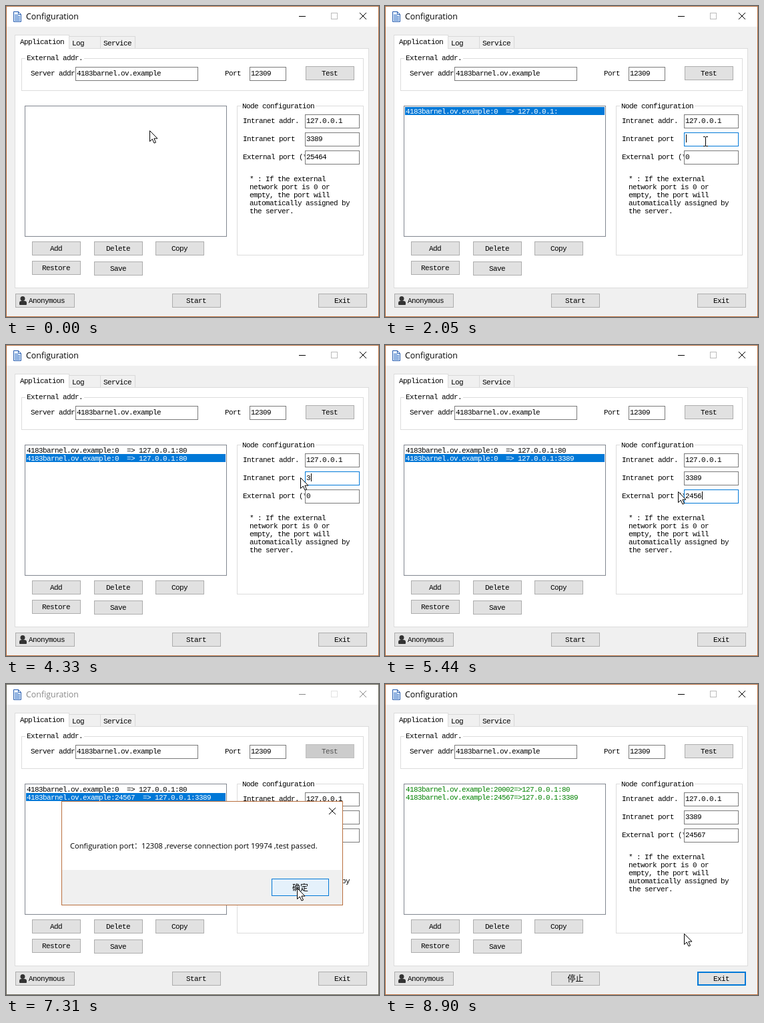
Write an HTML page with a canvas that moves like this. It is 559 px wide and 465 px high and loops after 8940 ms.

```html
<!DOCTYPE html>
<html lang="en">
<head>
<meta charset="utf-8">
<title>Configuration</title>
<style>
html, body { margin: 0; width: 100%; height: 100%; overflow: hidden; background: #f0f0f0; }
canvas { display: block; width: 559px; height: 465px; }
</style>
</head>
<body>
<canvas id="stage" width="559" height="465"></canvas>
<script>
const ctx = document.getElementById('stage').getContext('2d');
const LOOP = 8940;
const HOST = '4183barnel.ov.example';
const BLUE = '#0078d7', BROWN = '#b96f3e';
const MONO = '11px "Liberation Mono", monospace';
const CJK = '12px "Noto Sans CJK SC", "Noto Sans CJK", sans-serif';
const ui = size => `${size}px "Open Sans", "Noto Sans CJK SC", "Noto Sans CJK", sans-serif`;

// Pointer stops: arrival time, x, y
const MOVE = 300;
const STOPS = [
  [0, 215, 186], [340, 78, 364], [760, 478, 172], [1880, 480, 202],
  [2920, 262, 364], [3400, 302, 200], [3780, 476, 199], [4180, 441, 198],
  [4680, 470, 226], [4900, 439, 219], [6290, 481, 105], [6850, 440, 313],
  [7160, 436, 305], [7750, 285, 438], [8430, 149, 164], [8880, 448, 373]
];
const CLICK = { Add: 380, addr: 790, port: 1900, Copy: 2980, portAgain: 3880,
  ext: 4710, Test: 6330, ok: 7350, Start: 7860 };
const FOCUS_AFTER = { portAgain: 'port', Test: 'addr', ok: '', Start: 'Exit' };
const TYPING = {
  addr: { text: '127.0.0.1', from: 820, gap: 85 },
  port: { text: '80', from: 2450, gap: 110 },
  portAgain: { text: '3389', from: 4290, gap: 65 },
  ext: { text: '24567', from: 4900, gap: 170 }
};
const OPEN = 6530, CLOSE = 7380, FADE = 110;
const FIELDS = { addr: [448, 162, 82, 21], port: [448, 189, 82, 21], ext: [448, 216, 82, 21],
  server: [104, 91, 184, 21], main: [365, 91, 55, 21] };
const NOTE = ['* : If the external', 'network port is 0 or', 'empty, the port will',
  'automatically assigned by', 'the server.'];

let t = 0, pointer = [0, 0], focus = '', active = true, lastKey = 0;

const clamp = v => Math.max(0, Math.min(1, v));
const ease = p => p * p * (3 - 2 * p);
const inside = ([x, y, w, h]) =>
  pointer[0] >= x && pointer[0] < x + w && pointer[1] >= y && pointer[1] < y + h;

function typed(name) {
  const { text, from, gap } = TYPING[name];
  const count = Math.min(text.length, Math.floor((t - from) / gap) + 1);
  if (count <= 0) return '';
  lastKey = Math.max(lastKey, from + (count - 1) * gap);
  return text.slice(0, count);
}

function pointerAt() {
  const next = STOPS.findIndex(s => s[0] > t);
  if (next < 0) return STOPS[STOPS.length - 1].slice(1);
  const a = STOPS[next - 1], b = STOPS[next];
  const from = Math.max(a[0], b[0] - MOVE);
  const p = ease(clamp((t - from) / (b[0] - from)));
  return [1, 2].map(k => Math.round(a[k] + (b[k] - a[k]) * p));
}

function fill(x, y, w, h, color) {
  ctx.fillStyle = color;
  ctx.fillRect(x, y, w, h);
}

function box(x, y, w, h, bg, edge, width = 1) {
  fill(x + width, y + width, w - 2 * width, h - 2 * width, bg);
  ctx.strokeStyle = edge;
  ctx.lineWidth = width;
  ctx.strokeRect(x + width / 2, y + width / 2, w - width, h - width);
}

function write(s, x, cy, color = '#000', font = MONO, align = 'left') {
  ctx.font = font;
  ctx.letterSpacing = font === MONO ? '-0.6px' : '0px';
  ctx.textAlign = align;
  ctx.fillStyle = color;
  ctx.fillText(s, x, cy + 4);
}

function line(points, color) {
  ctx.strokeStyle = color;
  ctx.lineWidth = 1;
  ctx.beginPath();
  points.forEach(([x, y]) => ctx.lineTo(x, y));
  ctx.stroke();
}

function cross(x, y, color) {
  line([[x, y], [x + 10, y + 10]], color);
  line([[x + 10, y], [x, y + 10]], color);
}

function button(label, x, y, { w = 73, h = 21, textX, off, idle = !active, focused = focus === label } = {}) {
  let bg = '#e1e1e1', edge = '#adadad', width = 1;
  if (off) { bg = '#cccccc'; edge = '#bfbfbf'; }
  else if (!idle && inside([x, y, w, h])) { bg = '#e5f1fb'; edge = BLUE; }
  else if (focused) { edge = BLUE; width = 2; }
  box(x, y, w, h, bg, edge, width);
  const cy = y + Math.floor(h / 2);
  if (/[^\x00-\x7f]/.test(label)) write(label, x + w / 2, cy + 0.5, '#000', CJK, 'center');
  else write(label, textX || Math.floor(x + (w - label.length * 6) / 2), cy, off ? '#555' : '#000');
}

function field(name, text, selected) {
  const [x, y, w, h] = FIELDS[name], focused = focus === name;
  box(x, y, w, h, '#fff', focused ? BLUE : '#7a7a7a');
  if (selected) fill(x + 3, y + 3, text.length * 6, 12, BLUE);
  write(text, x + 2, y + 9, selected ? '#fff' : '#000');
  const caret = focused && active && !selected && t - lastKey < 370;
  if (caret) fill(x + 3 + text.length * 6, y + 3, 1, 12, '#000');
}

function group(title, x, y, w, h, textX, textY) {
  box(x, y, w, h, '#fff', '#dcdcdc');
  fill(textX - 2, y, title.length * 6 + 4, 1, '#fff');
  write(title, textX, textY);
}

function titleBar() {
  const ink = active ? '#000' : '#888';
  fill(0, 0, 559, 31, '#fff');
  const page = new Path2D('M11.5 8.5h7l4 4v11h-11z M18.5 8.5v4h4');
  ctx.fillStyle = '#e6f0fb';
  ctx.fill(page);
  ctx.strokeStyle = '#2a5fb0';
  ctx.lineWidth = 1;
  ctx.stroke(page);
  for (let y = 13; y < 22; y += 2) fill(13, y, y < 14 ? 5 : 8, 1, '#3f78c8');
  write('Configuration', 30, 16, ink, ui(12.4));
  fill(439, 15, 10, 1, ink);
  box(487, 10, 10, 10, '#fff', active ? '#bbb' : '#e2e2e2');
  cross(530, 10, ink);
}

function tabs() {
  fill(0, 31, 559, 434, '#f0f0f0');
  box(94, 45, 48, 19, '#f0f0f0', '#d9d9d9');
  box(141, 45, 53, 19, '#f0f0f0', '#d9d9d9');
  box(13, 63, 531, 359, '#fff', '#dcdcdc');
  box(13, 43, 82, 21, '#fff', '#dcdcdc');
  fill(14, 62, 80, 3, '#fff');
  write('Application', 21, 53);
  write('Log', 99, 55);
  write('Service', 146, 55);
}

function rows(running) {
  const first = t < CLICK.port ? '' : HOST + ':0  => 127.0.0.1:' + (t < CLICK.Copy ? '' : '80');
  const second = HOST + (t < CLICK.Test ? ':0' : ':24567') +
    '  => 127.0.0.1:' + (t < CLICK.ext ? '80' : '3389');
  const items = running ? [HOST + ':20002=>127.0.0.1:80', HOST + ':24567=>127.0.0.1:3389']
    : t < CLICK.Add ? [] : t < CLICK.Copy ? [first] : [first, second];
  box(28, 149, 303, 196, '#fff', '#828790');
  items.forEach((s, i) => {
    const chosen = !running && i === items.length - 1;
    if (chosen) fill(30, 151 + i * 12, 299, 12, BLUE);
    write(s, 31, 157 + i * 12, running ? '#008000' : chosen ? '#fff' : '#000');
  });
}

function nodePanel() {
  const fresh = t < CLICK.Add;
  const addr = fresh ? '127.0.0.1' : typed('addr');
  const port = fresh ? '3389' : typed('portAgain') || typed('port');
  const ext = fresh ? '25464' : typed('ext') || (t < CLICK.port ? '' : '0');
  group('Node configuration', 346, 149, 190, 224, 354, 149);
  ['Intranet addr.', 'Intranet port', 'External port (*'].forEach((s, i) => write(s, 355, 171 + i * 27));
  field('addr', addr);
  field('port', port, t >= CLICK.portAgain + 140 && t < TYPING.portAgain.from);
  field('ext', ext, t >= CLICK.ext + 80 && t < TYPING.ext.from);
  NOTE.forEach((s, i) => write(s, 365, 258 + i * 12));
}

function person() {
  ctx.fillStyle = '#333';
  ctx.beginPath();
  ctx.arc(25, 437.5, 3.5, 0, 7);
  ctx.roundRect(20, 441, 11, 6, [3, 3, 1, 1]);
  ctx.fill();
}

function mainWindow() {
  const running = t >= CLICK.Start + 60;
  titleBar();
  tabs();
  group('External addr.', 23, 78, 513, 49, 31, 77);
  write('Server addr', 37, 100);
  write('Port', 328, 100);
  field('server', HOST);
  field('main', '12309');
  button('Test', 449, 90, { off: t >= CLICK.Test && t < CLOSE + 50 });
  rows(running);
  nodePanel();
  button('Add', 39, 352);
  button('Delete', 132, 352);
  button('Copy', 224, 352);
  button('Restore', 39, 381);
  button('Save', 132, 382);
  button('Anonymous', 14, 430, { w: 89, textX: 34 });
  person();
  button(running ? '停止' : 'Start', 249, 430);
  button('Exit', 468, 430);
  ctx.strokeStyle = active ? BROWN : '#6b685a';
  ctx.lineWidth = 1;
  ctx.strokeRect(0.5, 0.5, 558, 464);
}

function dialog(show) {
  if (!show) return;
  const scale = 0.95 + 0.05 * show;
  ctx.save();
  ctx.globalAlpha = show;
  ctx.translate(294, 253);
  ctx.scale(scale, scale);
  ctx.translate(-294, -253);
  box(83, 175, 422, 103, '#fff', '#fff');
  fill(84, 278, 420, 52, '#f0f0f0');
  ctx.strokeStyle = BROWN;
  ctx.strokeRect(83.5, 175.5, 421, 155);
  cross(484, 185, '#000');
  write('Configuration port：12308 ,reverse connection port 19974 ,test passed.', 96, 242, '#000', ui(11.15));
  button('确定', 398, 291, { w: 86, h: 26, focused: true, idle: show < 1 });
  ctx.restore();
}

function drawPointer() {
  const [x, y] = pointer;
  if (active && Object.values(FIELDS).some(inside)) {
    fill(x, y - 6, 1, 13, '#000');
    for (const dy of [-7, 7]) {
      fill(x - 3, y + dy, 3, 1, '#000');
      fill(x + 1, y + dy, 3, 1, '#000');
    }
    return;
  }
  ctx.save();
  ctx.translate(x + 0.5, y + 0.5);
  const arrow = new Path2D('M0 0V16L3.8 12.5L6.5 18.5L9 17.5L6.4 11.6H11.5Z');
  ctx.fillStyle = '#fff';
  ctx.fill(arrow);
  ctx.strokeStyle = '#000';
  ctx.lineWidth = 1;
  ctx.stroke(arrow);
  ctx.restore();
}

function draw(now) {
  t = now % LOOP;
  pointer = pointerAt();
  const show = clamp((t - OPEN) / FADE) * (1 - clamp((t - CLOSE) / FADE));
  active = t < OPEN || t >= CLOSE;
  const clicked = Object.keys(CLICK).filter(k => CLICK[k] <= t).pop() || '';
  focus = show === 1 ? '' : FOCUS_AFTER[clicked] ?? clicked;
  lastKey = CLICK[clicked] || 0;
  mainWindow();
  dialog(show);
  drawPointer();
}

const start = performance.now();
function tick() {
  draw(performance.now() - start);
  requestAnimationFrame(tick);
}
tick();
</script>
</body>
</html>
```
